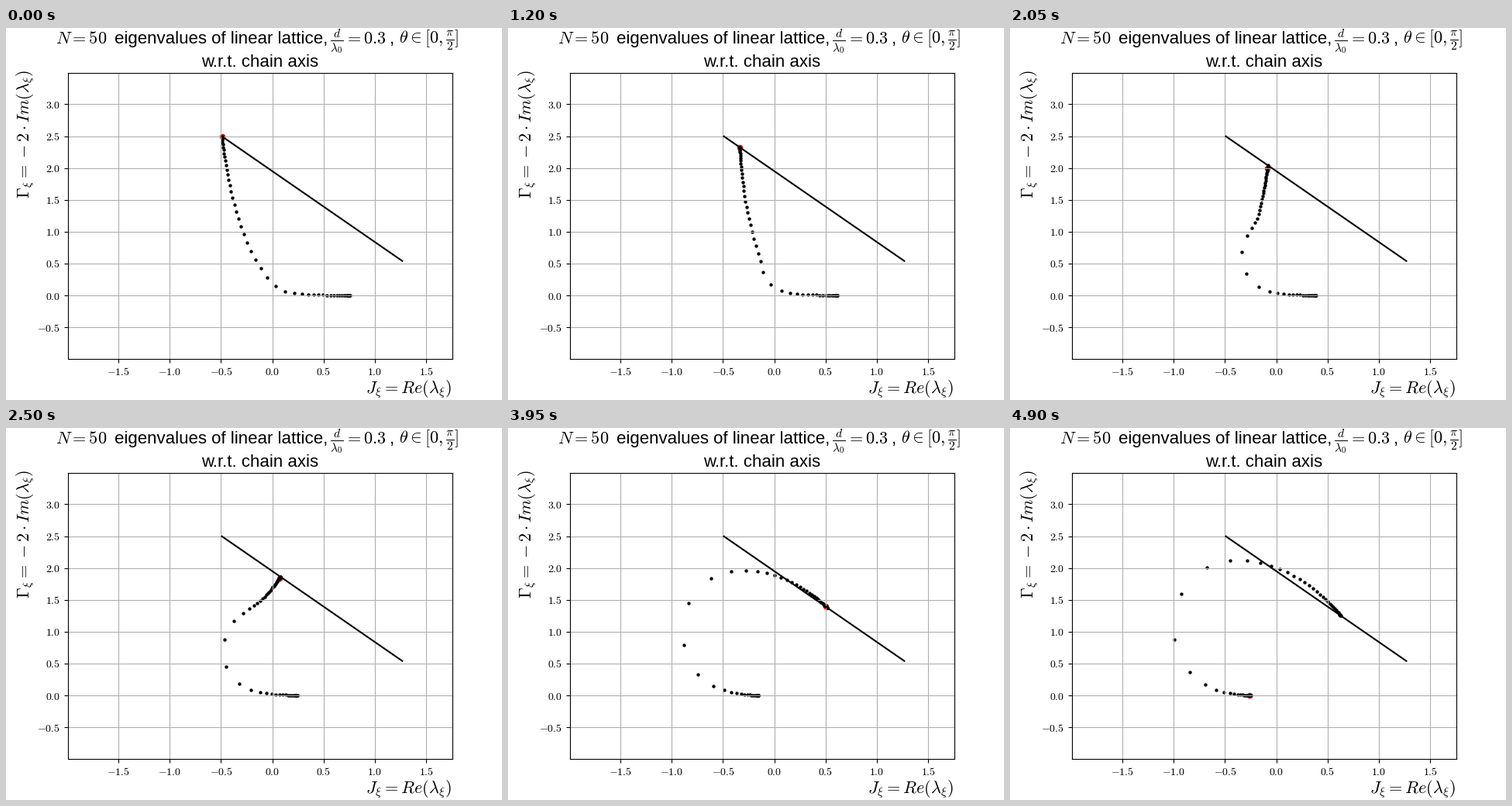
Animation of 640x480 px, one loop 4.95 s. Source, as a matplotlib script:

```python
import numpy as np
import matplotlib.pyplot as plt
from matplotlib.animation import FuncAnimation

W, H = 640, 480
N = 50
SPACING = 0.3
FRAMES = 99

plt.rcParams["font.family"] = "Liberation Sans"
plt.rcParams["mathtext.fontset"] = "cm"

site = np.arange(N)
kr = 2 * np.pi * SPACING * np.abs(site[:, None] - site[None, :])
x = np.where(kr == 0, 1, kr)
sines = np.sin(np.pi * np.outer(site + 1, site + 1) / (N + 1))


def coupling(theta):
    """Dipole-dipole matrix for dipoles tilted by theta from the chain."""
    near = (1 - 3 * np.cos(theta) ** 2) * (1j / x - 1 / x**2)
    m = -0.75 * np.exp(1j * x) / x * (np.sin(theta) ** 2 + near)
    np.fill_diagonal(m, -0.5j)
    return m


def points(values):
    return np.column_stack([values.real, -2 * values.imag])


def marked_mode(i):
    if i < 28:
        return 1
    return 6 if i < 84 else 46


thetas = np.linspace(0, np.pi / 2, FRAMES + 1)
spectra = [np.linalg.eig(coupling(t)) for t in thetas]
clouds = [points(values) for values, _ in spectra]
marks = []
for i, (_, vectors) in enumerate(spectra):
    overlap = np.abs(sines[marked_mode(i) - 1] @ vectors)
    marks.append(clouds[i][overlap.argmax()])

fig = plt.figure(figsize=(W / 100, H / 100), dpi=100, facecolor="white")
ax = fig.add_axes([0.125, 0.11, 0.775, 0.77])
ax.grid(True)
ax.set_xticks(np.arange(-1.5, 1.6, 0.5))
ax.set_yticks(np.arange(-0.5, 3.1, 0.5))
for axis in (ax.xaxis, ax.yaxis):
    axis.set_major_formatter(lambda v, pos: f"${v:.1f}$")

everything = np.vstack(clouds)
low, high = everything.min(axis=0) - 1, everything.max(axis=0) + 1
ax.set_xlim(low[0], high[0])
ax.set_ylim(low[1], high[1])

# Straight guide through the uniform mode at both ends of the sweep
start = clouds[0][clouds[0][:, 1].argmax()]
end = clouds[-1][clouds[-1][:, 0].argmax()]
guide = start + thetas[:, None] * (end - start)
ax.plot(guide[:, 0], guide[:, 1], "k", lw=1.5)

# Scatter layers sit below the grid
mark = ax.scatter([], [], s=30, c="red", linewidths=0)
dots = ax.scatter([], [], s=10, c="black", linewidths=0)


def put(px, py, text, **kw):
    fig.text(px / W, 1 - py / H, text, size=16, va="baseline", **kw)


put(64, 20, r"$N=50$")
put(139.5, 20, "eigenvalues of linear lattice,")
put(418, 20, r"$\frac{d}{\lambda_0}=0.3$")
put(495, 20, ",")
put(507, 20, r"$\theta\in[0,\frac{\pi}{2}]$")
put(328, 50, "w.r.t. chain axis", ha="center")
put(575.5, 471, r"$J_\xi=Re(\lambda_\xi)$", ha="right")
put(30, 220, r"$\Gamma_\xi=-2\cdot Im(\lambda_\xi)$",
    rotation=90, rotation_mode="anchor")


def update(i):
    mark.set_offsets([marks[i]])
    dots.set_offsets(clouds[i])
    return mark, dots


anim = FuncAnimation(fig, update, frames=FRAMES, interval=50,
                     repeat=True, repeat_delay=0)
plt.show()
```
